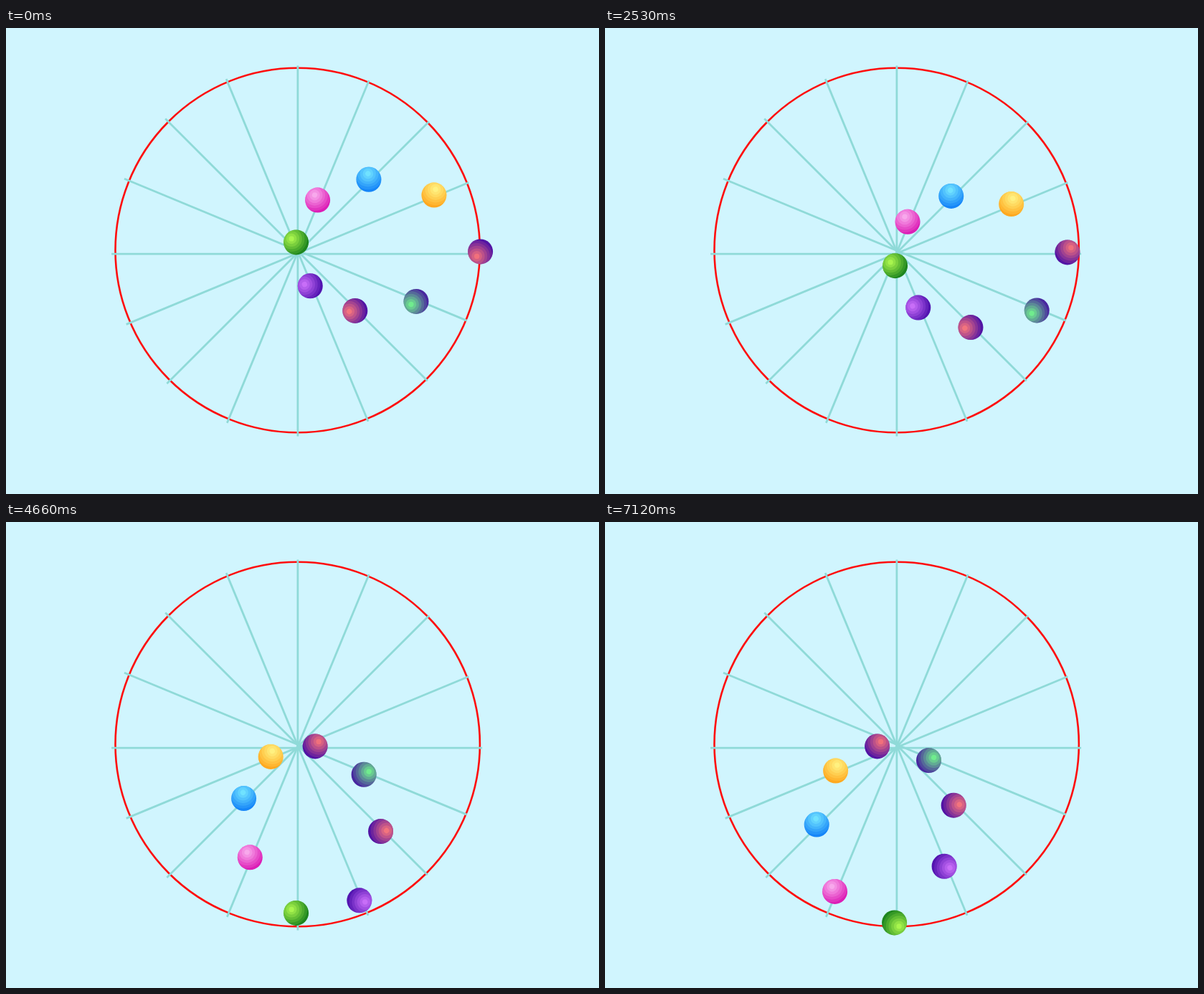
Write an HTML page with a canvas that moves like this. It is 827 px wide and 650 px high and loops after 7.22 s.

```html
<!DOCTYPE html>
<html lang="en">
<head>
<meta charset="utf-8">
<title>Balls on spokes</title>
<style>
  html, body { margin: 0; width: 100%; height: 100%; overflow: hidden; background: #d0f5fe; }
  canvas { display: block; width: 827px; height: 650px; }
</style>
</head>
<body>
<canvas id="stage" width="827" height="650"></canvas>
<script>
const ctx = document.getElementById('stage').getContext('2d');
const LOOP = 7220;
const STEP = 140;                // usual time between two poses
const COUNT = 8;
const RADIUS = 17.5;
const HALF = 531;                // path length from turn to turn, rest included
const REACH = 261;               // balls rest briefly at this distance
const LAG = 65;                  // path length between neighbouring balls
const BANDS = 7;
const LIGHT = { x: 5, y: -6.5 }; // highlight of a ball moving outward

// highlight and edge colour of each ball
const colors = [
  ['#f0707c', '#5214a4'], ['#fff180', '#ffa920'], ['#70e2ff', '#1686f8'], ['#f8a8ec', '#dc1eb6'],
  ['#a8f44e', '#1e861e'], ['#c86ef8', '#5214b0'], ['#f2747e', '#5214a4'], ['#70ec8e', '#48289f']
];

// key points: [time, path travelled by the first ball]
const travel = [
  [0, 8], [1000, 422], [1960, 810], [3090, 1264.5],
  [4660, 1885.5], [5730, 2326.5], [7120, 2896]
];

function pathAt(t) {
  let i = travel.findIndex(key => key[0] > t);
  if (i < 0) return travel[travel.length - 1][1];
  const [t0, p0] = travel[i - 1], [t1, p1] = travel[i];
  const steps = Math.round((t1 - t0) / STEP);
  return p0 + (p1 - p0) * Math.floor((t - t0) / (t1 - t0) * steps) / steps;
}

function circle(x, y, r) {
  ctx.beginPath();
  ctx.arc(x, y, r, 0, Math.PI * 2);
}

// Runs paint in the frame of spoke i, with x pointing outward.
function onSpoke(i, paint) {
  ctx.save();
  ctx.translate(404.1, 312.4);
  ctx.rotate(-i * Math.PI / COUNT);
  paint();
  ctx.restore();
}

function drawSpoke() {
  ctx.beginPath();
  ctx.moveTo(-257, 2.8);
  ctx.lineTo(260, 2.8);
  ctx.stroke();
}

function drawWheel() {
  ctx.fillStyle = '#d0f5fe';
  ctx.fillRect(0, 0, 827, 650);
  ctx.lineWidth = 2.6;
  ctx.strokeStyle = '#ff0c0c';
  circle(406.7, 310, 254.2);
  ctx.stroke();
  ctx.lineWidth = 2.8;
  ctx.strokeStyle = '#8fdad8';
  for (let i = 0; i < COUNT; i++) onSpoke(i, drawSpoke);
}

// Equal colour steps: each smaller disc mixes in more of the highlight.
function drawBall([inner, outer]) {
  const far = RADIUS + Math.hypot(LIGHT.x, LIGHT.y);
  circle(0, 0, RADIUS);
  ctx.fillStyle = outer;
  ctx.fill();
  ctx.clip();
  ctx.fillStyle = inner;
  for (let k = BANDS - 1; k > 0; k--) {
    ctx.globalAlpha = 1 / k;
    circle(LIGHT.x, LIGHT.y, far * k / BANDS);
    ctx.fill();
  }
}

function draw(t) {
  const path = pathAt(t);
  drawWheel();
  colors.forEach((pair, i) => {
    const p = (path - i * LAG + 2 * HALF) % (2 * HALF);
    const turn = p < HALF ? -1 : 1;
    const s = turn * (p % HALF - HALF / 2);
    onSpoke(i, () => {
      ctx.translate(Math.max(-REACH, Math.min(REACH, s)), 0);
      ctx.scale(turn, turn);
      ctx.translate(0, 0.5);
      drawBall(pair);
    });
  });
}

const start = performance.now();
function loop() {
  draw((performance.now() - start) % LOOP);
  requestAnimationFrame(loop);
}
loop();
</script>
</body>
</html>
```
